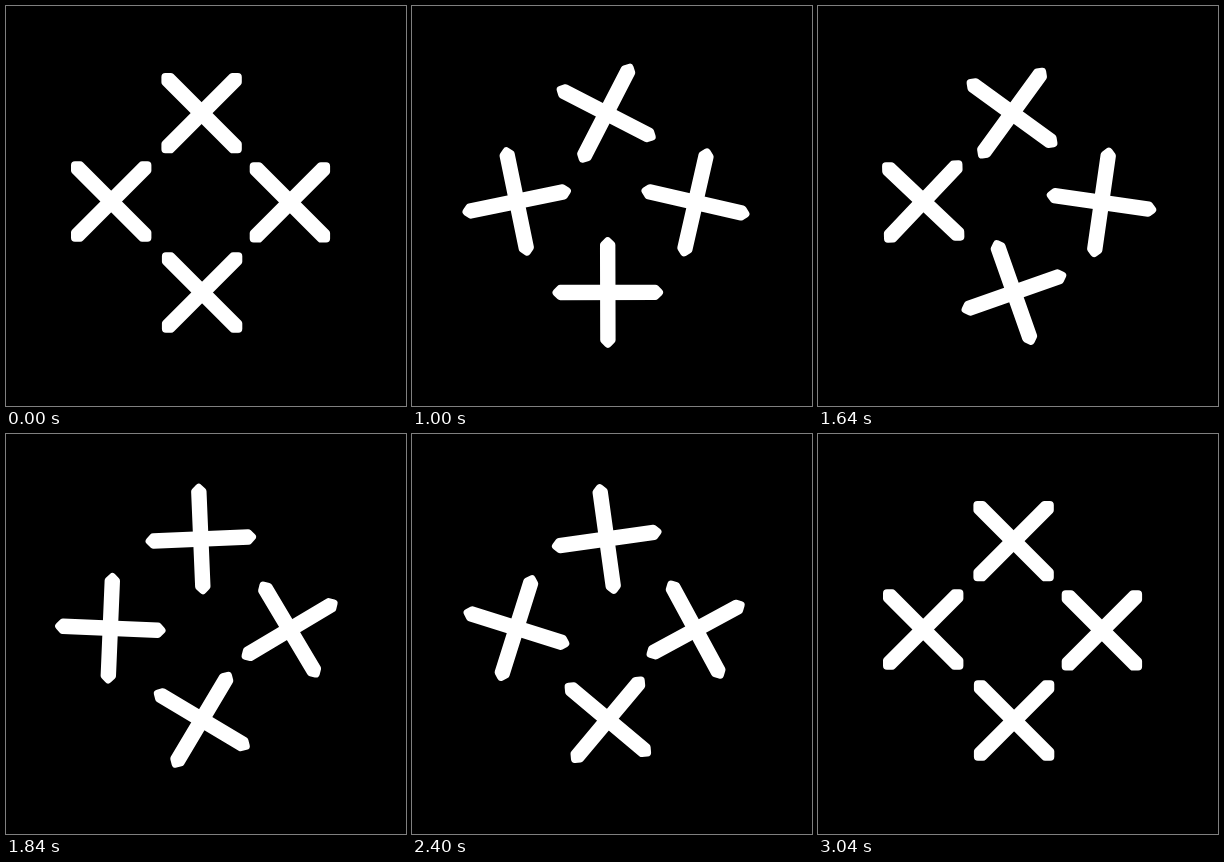
Recreate the animation shown at these times as an HTML page. Size 400 by 400 pixels, loop 3.8 s.

```html
<!DOCTYPE html>
<html lang="en">
<head>
<meta charset="utf-8">
<title>Spinning crosses</title>
<style>
  html, body { margin: 0; height: 100%; overflow: hidden; background: #000; }
  svg { display: block; width: 100%; height: 100%; filter: blur(0.6px); }
  path { fill: #fff; stroke: #fff; stroke-width: 8; stroke-linejoin: round; }
</style>
</head>
<body>
<svg id="stage" viewBox="0 0 400 400"></svg>
<script>
const LOOP = 3800, STEP = 40, FIRST_STEP = 16, SPIN_STEPS = 57, TURN = 1080;

// Pivot, and the cross's small offset from it; each starts one step after the last.
const crosses = [
  { x: 194.8, y: 106.2, dx: 0.8, dy: 0.9 },
  { x: 283.7, y: 196, dx: 0.2, dy: 0.4 },
  { x: 196, y: 286.1, dx: 0.1, dy: 0.4 },
  { x: 105, y: 194.7, dx: 0.2, dy: 0.8 }
];

// A bar with wedge-shaped ends; the stroke rounds its corners.
const half = 3.7, tip = 51.2, neck = tip - half;
const bar = `M${-tip} 0L${-neck} ${-half}H${neck}L${tip} 0L${neck} ${half}H${-neck}Z`;

const stage = document.getElementById('stage');
const add = (parent, tag, attrs = {}) => {
  const el = document.createElementNS('http://www.w3.org/2000/svg', tag);
  for (const key in attrs) el.setAttribute(key, attrs[key]);
  return parent.appendChild(el);
};

for (const cross of crosses) {
  cross.el = add(stage, 'g');
  for (const angle of [45, -45]) {
    add(cross.el, 'path', {
      d: bar,
      transform: `translate(${cross.dx} ${cross.dy}) rotate(${angle})`
    });
  }
}

const ease = u => u * u * (3 - 2 * u);
const clamp = u => Math.min(1, Math.max(0, u));

function draw(time) {
  const step = Math.floor((time % LOOP) / STEP) - FIRST_STEP;
  crosses.forEach(({ el, x, y }, i) => {
    const angle = TURN * ease(clamp((step - i) / SPIN_STEPS));
    el.setAttribute('transform', `translate(${x} ${y}) rotate(${angle})`);
  });
}

function tick() {
  draw(performance.now());
  requestAnimationFrame(tick);
}
tick();
</script>
</body>
</html>
```
